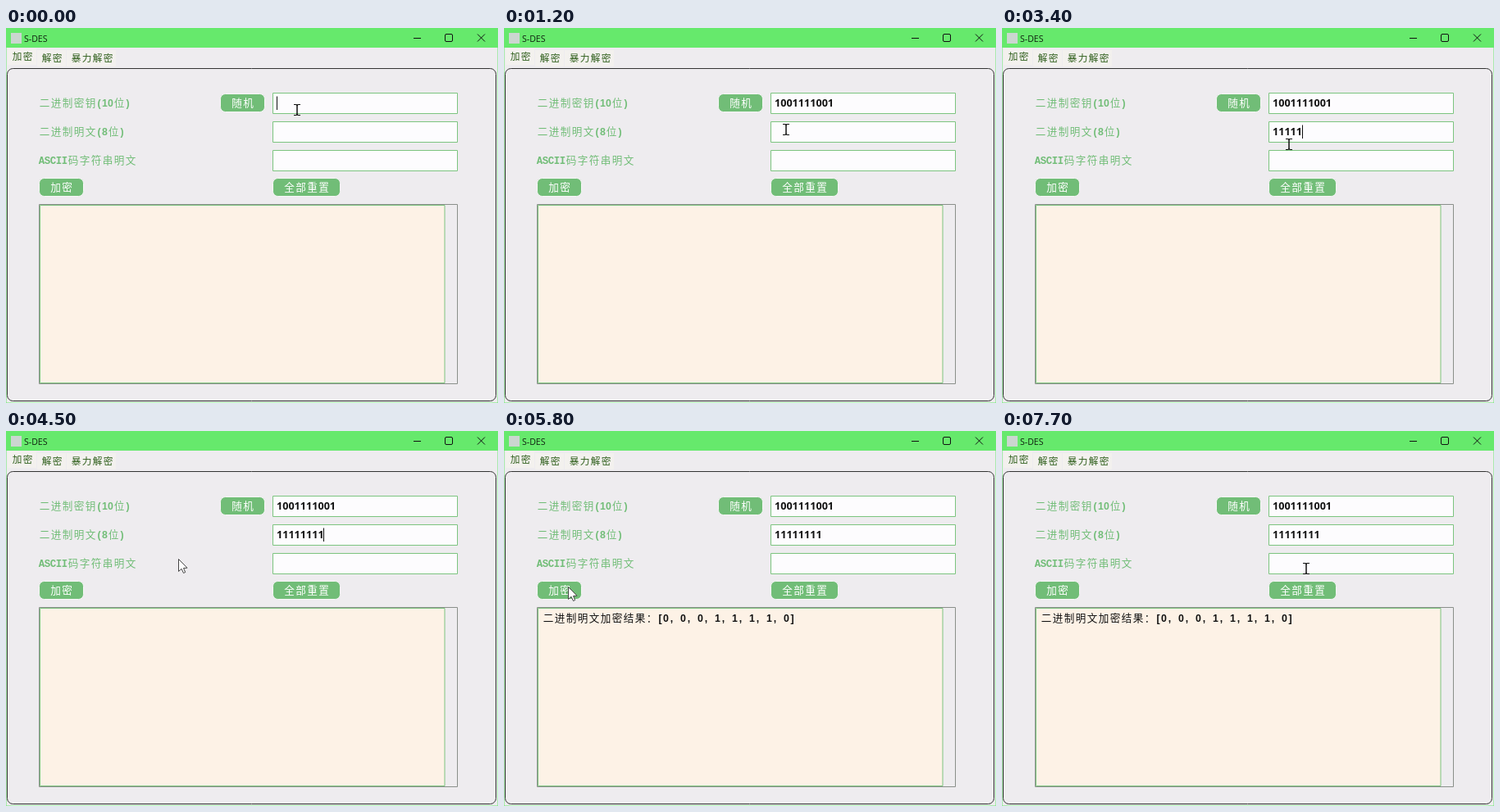
Animation, 600 px wide and 458 px high, one loop 8000 ms. Source, as an HTML page with a canvas:

```html
<!DOCTYPE html>
<html lang="zh-CN">
<head>
<meta charset="utf-8">
<title>S-DES</title>
<style>
  html, body { margin: 0; width: 100%; height: 100%; overflow: hidden; background: #eeecef; }
  canvas { display: block; width: 100vw; height: 100vh; }
</style>
</head>
<body>
<canvas id="stage" width="600" height="458"></canvas>
<script>
const ctx = document.getElementById('stage').getContext('2d');
const LOOP = 8000, STEP = 100, BLINK = 500;
const GREEN = '#71bd77', EDGE = '#7cc47f', PANEL = '#eeecef', INK = '#111';
const TITLE_GREEN = '#66e96c', TAB_TEXT = '#2f5f1c';
const CELL = 14, ROW = 35;
const TYPING = { start: 2500, interval: 225, count: 8 };

const FIELDS = [
  { label: '二进制密钥(10位)', focus: 0, blur: 700, value: t => t < 800 ? '' : '1001111001' },
  { label: '二进制明文(8位)', focus: 2200, blur: 5200, value: t => '1'.repeat(typedCount(t)) },
  { label: 'ASCII码字符串明文', focus: 7200, blur: LOOP, value: () => '' }
];

// The pointer rests between moves.
const POINTER_START = { x: 355, y: 100 };
const MOVES = [
  { from: 200, to: 500, x: 298, y: 92 },
  { from: 900, to: 1200, x: 344, y: 124 },
  { from: 1200, to: 1600, x: 350, y: 142 },
  { from: 4300, to: 4500, x: 210, y: 156 },
  { from: 4500, to: 5200, x: 78, y: 190 },
  { from: 5800, to: 6600, x: 382, y: 168 },
  { from: 6600, to: 7000, x: 371, y: 168 }
];

const clamp = (v, low, high) => Math.min(high, Math.max(low, v));
const easeOut = k => 1 - (1 - k) ** 2;
const typedCount = t =>
  clamp(Math.floor((t - TYPING.start) / TYPING.interval) + 1, 0, TYPING.count);

function rect(x, y, w, h, fill, stroke, radius = 0) {
  ctx.beginPath();
  ctx.roundRect(x, y, w, h, radius);
  if (fill) { ctx.fillStyle = fill; ctx.fill(); }
  if (stroke) { ctx.strokeStyle = stroke; ctx.lineWidth = 1; ctx.stroke(); }
}

function line(color, width, ...points) {
  ctx.beginPath();
  points.forEach(([x, y]) => ctx.lineTo(x, y));
  ctx.strokeStyle = color;
  ctx.lineWidth = width;
  ctx.stroke();
}

function text(string, x, y, color, font) {
  ctx.fillStyle = color;
  ctx.textAlign = 'left';
  ctx.font = font;
  ctx.fillText(string, x, y);
}

// Sets text on a grid: full cells for Han characters, half cells for the rest.
function gridText(string, x, y, color, cell = CELL) {
  ctx.fillStyle = color;
  ctx.textAlign = 'center';
  for (const ch of string) {
    const wide = ch > '\u2fff', width = wide ? cell : cell / 2;
    const family = /[A-Z]/.test(ch) ? '"Liberation Mono", monospace' : '"Liberation Sans", sans-serif';
    ctx.font = wide
      ? `500 ${cell * 0.9}px "Noto Sans CJK SC", "Noto Sans CJK", sans-serif`
      : `bold ${cell * 0.88}px ${family}`;
    ctx.fillText(ch, x + width / 2, y);
    x += width;
  }
}

function button(label, x, y, w) {
  rect(x - 0.5, y - 0.5, w + 1, 22, GREEN, '#f5f7f5', 6);
  gridText(label, x + (w - label.length * CELL) / 2, y + 14.5, '#fff');
}

function tab(label, x, y, w) {
  rect(x, y, w, 20, '#f3f1ee');
  gridText(label, x + 5, y + 14, TAB_TEXT, 13);
}

function drawTitleBar() {
  rect(0, 0, 600, 24, TITLE_GREEN);
  rect(6, 6, 13, 13, '#cbd6d0');
  text('S-DES', 22, 16.5, '#102010', '10.5px "Open Sans", sans-serif');
  line(INK, 1, [497, 12.5], [506, 12.5]);
  rect(535.5, 7.5, 9, 9, null, INK, 1.5);
  line(INK, 1, [575, 7.5], [584, 16.5]);
  line(INK, 1, [584, 7.5], [575, 16.5]);
}

function drawWindow() {
  rect(0, 0, 600, 458, PANEL, TITLE_GREEN);
  drawTitleBar();
  tab('加密', 2, 25, 35);
  tab('解密', 38, 27, 35);
  tab('暴力解密', 74, 27, 60);
  rect(1.5, 49.5, 596, 406, PANEL, '#333', 7);
  button('随机', 262, 81, 53);
  button('加密', 41, 184, 53);
  button('全部重置', 326, 184, 81);
  rect(40.5, 215.5, 510, 219, PANEL, '#8a8f8a');
  rect(41.5, 216.5, 493.5, 217, '#fdf2e6', EDGE);
}

function drawField({ label, focus, blur, value }, row, t) {
  const top = 79.5 + ROW * row, content = value(t);
  gridText(label, 40, top + 16, GREEN);
  rect(325.5, top, 225, 25, '#fdfcfe', EDGE);
  text(content, 330, top + 16, INK, '600 12.6px "Noto Sans", sans-serif');

  const typing = content && typedCount(t) < TYPING.count;
  const lit = typing || (t - focus) % (2 * BLINK) < BLINK;
  if (t >= focus && t < blur && lit) {
    const x = Math.floor(330 + ctx.measureText(content).width) + 0.5;
    line(INK, 1, [x, top + 4], [x, top + 20.5]);
  }
}

function pointerAt(t) {
  let { x, y } = POINTER_START;
  for (const move of MOVES) {
    const k = easeOut(clamp((t - move.from) / (move.to - move.from), 0, 1));
    x += (move.x - x) * k;
    y += (move.y - y) * k;
  }
  return [x, y];
}

function drawPointer(x, y) {
  ctx.save();
  ctx.translate(Math.round(x), Math.round(y));
  if (x > 325) {
    line(INK, 1.5, [0, -6], [0, 6]);
    for (const end of [-6.5, 6.5]) {
      line(INK, 1.2, [-4, end], [-1, end], [0, end * 0.85], [1, end], [4, end]);
    }
  } else {
    ctx.beginPath();
    [[0, 0], [0, 15], [3.5, 11.8], [6, 17], [8.2, 16], [6, 11], [10.5, 10.7]]
      .forEach(([px, py]) => ctx.lineTo(px + 0.5, py + 0.5));
    ctx.closePath();
    ctx.fillStyle = '#fff';
    ctx.fill();
    ctx.strokeStyle = '#444';
    ctx.lineWidth = 1;
    ctx.stroke();
  }
  ctx.restore();
}

function draw(t) {
  drawWindow();
  FIELDS.forEach((field, row) => drawField(field, row, t));
  if (t >= 5400) gridText('二进制明文加密结果：[0, 0, 0, 1, 1, 1, 1, 0]', 47, 233, INK);
  drawPointer(...pointerAt(t));
}

const start = performance.now();
function frame() {
  const t = (performance.now() - start) % LOOP;
  draw(Math.floor(t / STEP) * STEP);
  requestAnimationFrame(frame);
}
frame();
</script>
</body>
</html>
```
